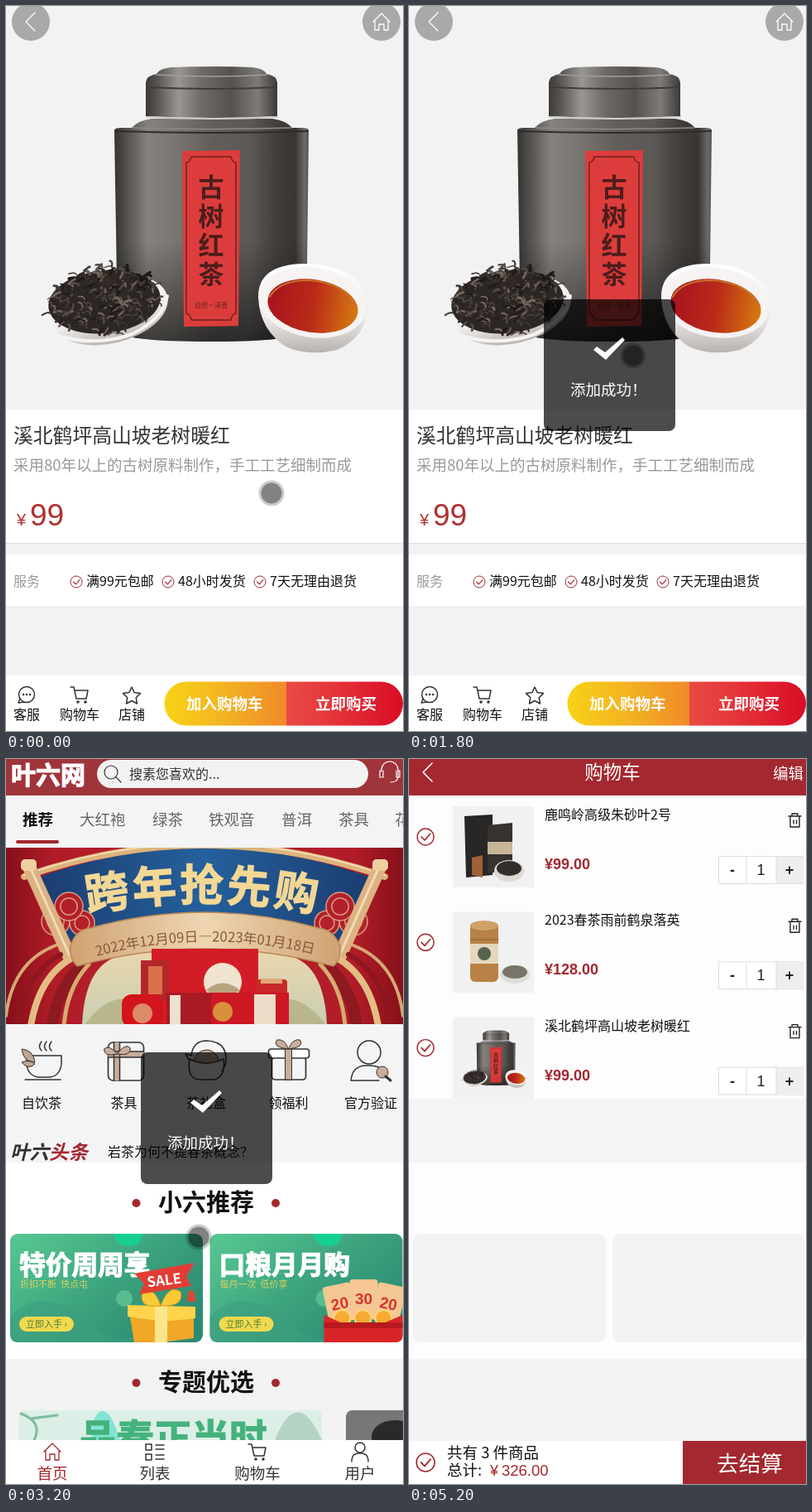
These frames come from a looping animation (480 by 875 pixels, 6000 ms). An HTML page:

```html
<!DOCTYPE html>
<html lang="zh-CN">
<head>
<meta charset="utf-8">
<title>购物流程</title>
<style>
html, body { margin: 0; width: 100%; height: 100%; overflow: hidden; background: #fff; }
svg { display: block; width: 480px; height: 875px; }
text { font-family: "Noto Sans CJK SC", "Noto Sans CJK", "Noto Sans", sans-serif; white-space: pre; }
.num { font-family: "Liberation Sans", Arial, sans-serif; }
.line { fill: none; stroke-linecap: round; stroke-linejoin: round; }
</style>
</head>
<body>
<svg id="stage" viewBox="0 0 480 875"></svg>
<script>
const RED = '#a3282f', DARK = '#333', GREY = '#f2f2f2';

// Drawing helpers, each returns markup
const text = (x, y, s, size, fill = '#111', more = '') =>
  `<text x="${x}" y="${y}" font-size="${size}" fill="${fill}" ${more}>${s}</text>`;
const mid = (x, y, s, size, fill, more = '') => text(x, y, s, size, fill, 'text-anchor="middle" ' + more);
const heavy = fill => `font-weight="900" stroke="${fill}" stroke-width="1.2"`;
const rect = (x, y, w, h, fill, r = 0, more = '') =>
  `<rect x="${x}" y="${y}" width="${w}" height="${h}" rx="${r}" fill="${fill}" ${more}/>`;
const circle = (x, y, r, fill, more = '') => `<circle cx="${x}" cy="${y}" r="${r}" fill="${fill}" ${more}/>`;
const oval = (x, y, rx, ry, fill, more = '') =>
  `<ellipse cx="${x}" cy="${y}" rx="${rx}" ry="${ry}" fill="${fill}" ${more}/>`;
const shape = (d, fill, more = '') => `<path d="${d}" fill="${fill}" ${more}/>`;
const line = (d, stroke = DARK, w = 1.5) => `<path class="line" d="${d}" stroke="${stroke}" stroke-width="${w}"/>`;
const at = (x, y, s, more = '') => `<g transform="translate(${x} ${y}) ${more}">${s}</g>`;
const ring = (x, y, r, stroke = DARK, w = 1.5) => circle(x, y, r, 'none', `stroke="${stroke}" stroke-width="${w}"`);
const grad = (id, stops, dir = '') => `<linearGradient id="${id}" ${dir}>` +
  stops.map(([o, c]) => `<stop offset="${o}" stop-color="${c}"/>`).join('') + '</linearGradient>';
const BOLD = 'font-weight="700"', DOWN = 'x2="0" y2="1"';

const tick = (x, y, r) => ring(x, y, r, RED, r / 7) +
  line(`M${x - r * .5} ${y}l${r * .4} ${r * .4}l${r * .65} ${-r * .75}`, RED, r / 6);
const house = (x, y, c) => at(x, y, line('M-10 0L0-10L10 0M-8-1V10H-3V3H3V10H8V-1', c, 1.3));
const cart = (x, y) => at(x, y, line('M-11-9H-7L-4 5H8L10-5H-6') + circle(-2, 9, 1.8, DARK) + circle(7, 9, 1.8, DARK));

let seed = 7;
const rnd = () => (seed = seed * 16807 % 2147483647) / 2147483647;

const defs = '<defs>' +
  grad('metal', [[0, '#353331'], [.05, '#4d4a47'], [.17, '#85817d'], [.3, '#7b7773'], [.5, '#615e5b'], [.7, '#5b5855'], [.84, '#403d3b'], [.93, '#383634'], [.98, '#6d6a67'], [1, '#54514f']]) +
  grad('cap', [[0, '#3d3a38'], [.08, '#55524f'], [.25, '#9a9793'], [.42, '#6e6b68'], [.65, '#54514e'], [.85, '#7f7b78'], [1, '#3c3a38']]) +
  grad('shade', [[0, '#0000'], [.55, '#0000'], [1, '#0008']], DOWN) +
  grad('brew', [[0, '#a8131f'], [.5, '#b92a18'], [1, '#d67a10']]) +
  grad('china', [[0, '#fff'], [.6, '#eeecec'], [1, '#b9b2ae']], DOWN) +
  grad('gold', [[0, '#f8d216'], [.5, '#f2b322'], [1, '#f0892a']]) +
  grad('hot', [[0, '#e84a45'], [.4, '#e5353a'], [1, '#da0c26']]) +
  grad('drape', [[0, '#86101a'], [.12, '#b01c27'], [.5, '#b8222c'], [.88, '#b01c27'], [1, '#86101a']]) +
  grad('blue', [[0, '#1b3a6e'], [.5, '#24619c'], [1, '#1b3a6e']]) +
  grad('cream', [[0, '#d0a273'], [.5, '#eed6b2'], [1, '#d0a273']]) +
  grad('scene', [[0, '#ecd7ad'], [1, '#c9cfb4']], DOWN) +
  grad('green', [[0, '#58c892'], [.6, '#3aa17c'], [1, '#2c8a72']], 'y2=".7"') +
  '<clipPath id="banner"><path d="M0 107H480V320H0Z"/></clipPath>' +
  '<clipPath id="peek"><path d="M0 786H480V822H0Z"/></clipPath>' +
  '<path id="titleArc" d="M72 190Q238 152 404 191"/><path id="dateArc" d="M92 243Q240 199 390 240"/></defs>';

function leaves() {
  const tones = ['#1e1917', '#332c29', '#544b46', '#75675e', '#2a2422', '#443c39'];
  let s = oval(119, 357, 68, 38, '#2d2724', 'transform="rotate(-6 119 357)"');
  for (let i = 0; i < 260; i++) {
    const a = rnd() * 6.283, r = Math.sqrt(rnd()), d = rnd() * 6.283;
    const x = 119 + 69 * r * Math.cos(a), y = 356 + 42 * r * Math.sin(a) - (x - 119) * .08;
    const dx = 9 * Math.cos(d), dy = 7 * Math.sin(d);
    s += line(`M${x.toFixed(1)} ${y.toFixed(1)}q${(dx / 2 + 3).toFixed(1)} ${(dy / 2 - 3).toFixed(1)} ${dx.toFixed(1)} ${dy.toFixed(1)}`,
      tones[i % 6], 1.2 + rnd() * 1.8);
  }
  return s;
}

function teaSet() {
  const body = 'M131 150Q131 147 140 147H152Q160 138 176 136H322Q338 138 346 147H357Q366 147 366 150L363 394Q340 405 248 405Q150 405 135 394Z';
  const lid = 'M169 92Q170 84 182 82Q186 75 200 74Q248 72 298 74Q311 75 315 82Q327 84 328 92V133Q248 137 169 133Z';
  return '<g id="tea">' + shape(body, 'url(#metal)') + shape(body, 'url(#shade)') +
    line('M132 151Q248 155 365 151', '#2f2d2b', 2) + line('M153 147Q248 150 345 147', '#8c8986', 1.5) +
    shape(lid, 'url(#cap)') + line('M170 98Q248 102 327 98', '#3f3c3a', 2) +
    line('M182 83Q248 87 315 83', '#a09d9a', 1.5) + line('M170 134Q248 138 328 134', '#d0cdca', 2) +
    shape('M213 175L283 174L281 386L215 387Z', '#dc3d3c') +
    line('M224 182H272Q273 188 278 189V371Q273 372 272 379H224Q223 372 218 371V189Q223 188 224 182Z', '#6c2220', 1.5) +
    [...'古树红茶'].map((c, i) => mid(248, 230 + i * 35, c, 31, '#4d1d1b', BOLD)).join('') +
    mid(248, 364, '自然·清香', 8, '#6c2220') +
    oval(126, 367, 71, 40, 'url(#china)', 'transform="rotate(-14 126 367)"') + leaves() +
    line('M60 397Q108 412 152 396Q190 378 195 350', '#f5f3f1', 4) +
    shape('M305 352Q304 312 360 311Q432 313 438 360Q436 400 400 415Q368 423 340 412Q307 392 305 352Z', 'url(#china)') +
    oval(371, 358, 65, 42, '#f6f3f2', 'transform="rotate(9 371 358)"') +
    oval(371, 362, 55, 32, 'url(#brew)', 'transform="rotate(9 371 362)"') +
    line('M319 351Q330 331 366 331Q410 334 424 362', '#c5722c', 2) + '</g>';
}

function product() {
  const perks = [[85, '满99元包邮'], [196, '48小时发货'], [307, '7天无理由退货']];
  const pill = 'M339 815.5H218a26.5 26.5 0 0 0 0 53H339Z';
  return rect(0, 0, 480, 875, GREY) + teaSet() +
    circle(30, 19, 23, '#a9a9a9') + line('M35 8L24 19L35 30', '#fff', 1.3) +
    circle(454, 19, 23, '#a9a9a9') + house(454, 19, '#fff') +
    rect(0, 487, 480, 161, '#fff') + rect(0, 648, 480, 1, '#ddd') + rect(0, 662, 480, 62, '#fff') +
    text(9, 527, '溪北鹤坪高山坡老树暖红', 23.8, DARK) +
    text(9, 561, '采用80年以上的古树原料制作，手工工艺细制而成', 18.5, '#999') +
    text(13, 627, '¥', 20, '#b0302f', 'class="num"') + text(29, 627, '99', 37, '#b0302f', 'class="num"') +
    text(9, 700, '服务', 16, '#999') +
    perks.map(([x, s]) => tick(x, 695, 7) + text(x + 12, 700, s, 16)).join('') +
    rect(0, 808, 480, 67, '#fff') +
    ring(25, 831, 9.5) + line('M17 836L15 841L22 840') + [21, 25, 29].map(x => circle(x, 831, 1.3, DARK)).join('') +
    cart(89, 831) +
    line('M152 822L155.2 828.6L162.5 829.6L157.2 834.7L158.5 842L152 838.5L145.5 842L146.8 834.7L141.5 829.6L148.8 828.6Z') +
    text(9, 861, '客服', 16) + text(65, 861, '购物车', 16) + text(136, 861, '店铺', 16) +
    shape(pill, 'url(#gold)') + shape('M339 815.5H453.5a26.5 26.5 0 0 1 0 53H339Z', 'url(#hot)') +
    shape(pill, '#000', 'id="dim" opacity=".1"') +
    text(218, 849, '加入购物车', 18.5, '#fff', BOLD) + text(374, 849, '立即购买', 18.5, '#fff', BOLD);
}

function banner() {
  const side = [[60, 196, 17], [92, 198, 15], [76, 178, 17]].map(([x, y, r]) =>
      circle(x, y, r, '#b3202b') + ring(x, y, r, '#d99a7c') + ring(x, y, r * .6, '#d99a7c')).join('') +
    shape('M18 128L34 124L86 238L72 248Z', '#dcb183') + line('M28 128L78 240', '#f3dcb6', 3) +
    rect(18, 121, 19, 14, '#efd0a0', 5) +
    line('M80 240Q40 262 30 322', '#e3bd84', 8) + line('M95 246Q62 275 56 322', '#8c1a20', 14) +
    line('M100 248Q74 275 70 322', '#d6ab70', 5) + line('M60 225Q8 245 0 310', '#d6a873', 4) +
    line('M66 236Q24 258 14 322', '#8f1620', 6);
  const arc = (id, s, size, fill, more) =>
    `<text font-size="${size}" fill="${fill}" text-anchor="middle" ${more}><textPath href="#${id}" startOffset="50%">${s}</textPath></text>`;
  return '<g clip-path="url(#banner)">' + rect(0, 107, 480, 213, 'url(#drape)') +
    shape('M92 320Q95 255 130 240Q240 206 350 240Q385 255 388 320Z', 'url(#scene)') +
    shape('M96 320Q120 285 150 290Q240 265 330 290Q360 285 386 320Z', '#b7b68d') +
    shape('M30 146Q240 68 450 146L400 222Q240 164 80 222Z', 'url(#blue)') +
    line('M22 142Q240 66 458 142', '#dcb37c', 8) + line('M22 140Q240 64 458 140', '#f3dcb0', 2) +
    side + `<g transform="translate(480 0) scale(-1 1)">${side}</g>` +
    shape('M78 226Q84 206 102 204Q240 166 378 204Q396 206 404 226Q406 240 396 250Q240 208 86 250Q76 240 78 226Z', 'url(#cream)', 'stroke="#b98a58" stroke-width="1.5"') +
    arc('titleArc', '跨年抢先购', 53, '#f3d795', heavy('#f3d795') + ' letter-spacing="3"') +
    arc('dateArc', '2022年12月09日—2023年01月18日', 16.7, '#86593a', '') +
    rect(176, 229, 129, 92, '#d31d26') + circle(262, 269, 23, '#f0e3cf') + shape('M242 279Q262 262 283 279Q262 296 242 279Z', '#b8a37f') +
    rect(163, 243, 34, 50, '#b3272a') + rect(172, 250, 17, 34, '#db704a') +
    rect(303, 266, 37, 30, '#c82a2a', 4) + rect(308, 265, 26, 6, '#e0a878') +
    rect(140, 284, 50, 40, '#d4141c', 12) + circle(165, 307, 12, '#dd8a68') +
    rect(194, 282, 54, 40, '#a91b24') + rect(198, 285, 13, 36, '#eee1cd') +
    rect(248, 282, 94, 40, '#cc1822') + circle(262, 305, 12, '#d8903f') + rect(300, 284, 26, 36, '#eddcc8') + '</g>';
}

function shortcuts() {
  const edge = 'stroke="#333" stroke-width="1.7"';
  const icons = [
    line('M-18-6H24V4Q22 20 8 20H-4Q-17 18-18 4ZM-20 23H23') + line('M0-12q-5-5 0-11M6-12q-5-5 0-11M12-12q-5-5 0-11') +
      shape('M-24-14Q-10-13-8 2Q-22 2-24-14ZM-24 2Q-14-2-8 4Q-16 12-24 2Z', '#bda595', 'stroke="#333"'),
    rect(-19, -22, 43, 46, 'none', 6, edge) + rect(-12, -22, 7, 46, '#c9ad9b') +
      rect(-19, -11, 43, 7, '#c9ad9b') + line('M-19-11H24M-19-4H24M-5-22V24M-12-22V24') +
      shape('M-8-8Q-18-20-24-14Q-24-4-8-8ZM-8-8Q2-22 8-15Q8-5-8-8Z', '#c9ad9b', 'stroke="#333"'),
    line('M-20-2Q-24 22-8 23H9Q24 20 21-2M-20 0L-25-8L-17-6M-18-6Q-16-24 1-24Q23-23 24-4Q24 8 19 12M-20-2Q0 8 21-2') +
      shape('M-15 0Q-11-12 0-13Q11-13 16 0Q0 6-15 0Z', '#c9ad9b', 'stroke="#333"'),
    rect(-20, -4, 41, 27, 'none', 4, edge) + rect(-24, -14, 49, 11, '#fff', 3, edge) + rect(-4, -14, 8, 37, '#c9ad9b', 0, 'stroke="#333"') +
      shape('M0-14Q-20-16-14-25Q-5-27 0-14Q5-27 14-25Q20-16 0-14Z', '#c9ad9b', 'stroke="#333"'),
    ring(-2, -10, 14) + line('M-24 24Q-22 5-4 6Q10 5 15 13M-24 24H10') + circle(14, 14, 7, '#c9ad9b', 'stroke="#333"') + line('M18 19L24 24', DARK, 3)
  ];
  return ['自饮茶', '茶具', '茶礼盒', '领福利', '官方验证'].map((s, i) =>
    at(43 + i * 99.5, 364, icons[i]) + mid(43 + i * 99.5, 421, s, 16)).join('');
}

function promo(x, title, note, gift) {
  return at(x, 573, rect(0, 0, 233, 131, 'url(#green)', 9) +
    shape('M0 100Q40 60 90 105T180 100V131H9Q0 131 0 122Z', '#3c9f80', 'opacity=".6"') +
    shape('M125 0H160Q158 15 143 15Q128 14 125 0Z', '#18cf92') + circle(138, 78, 10, '#57bd91') +
    text(11, 49, title, 31.7, '#fff', heavy('#fff')) + text(12, 65, note, 11, '#d9d060') +
    rect(11, 100, 66, 18, '#f0d94e', 9) + text(19, 113, '立即入手 ›', 11, '#4c7d3a') + gift);
}

function home() {
  const sale = shape('M145 100H222V126L184 131H150Z', '#f0a826') + shape('M142 86L224 88V102L186 106L142 100Z', '#ffd34c') +
    shape('M175 87H190V131H175Z', '#fbe58c') +
    shape('M182 87Q155 90 160 72Q174 62 182 87Q192 60 206 70Q211 88 182 87Z', '#f9c936', 'stroke="#d99a20"') +
    shape('M150 48L223 35L213 52L219 63L156 73L162 60Z', '#e23d35') +
    mid(187, 62, 'SALE', 17, '#fff', BOLD + ' transform="rotate(-7 187 62)"') + shape('M214 82Q214 68 219 68Q224 68 224 82Z', '#d64b35');
  const coupon = (x, y, n, a) => at(x, y, rect(-17, -23, 34, 46, '#f5c793', 4) + mid(0, 7, n, 19, '#d5352c', 'class="num" ' + BOLD), `rotate(${a})`);
  const gifts = coupon(157, 84, '20', -12) + coupon(216, 84, '20', 12) + coupon(186, 78, '30', 0) +
    [160, 185, 210].map(x => circle(x, 102, 10, '#f5ab34', 'stroke="#ffd372" stroke-width="2"')).join('') +
    shape('M138 98L158 107H212L233 98V123Q233 131 224 131H138Z', '#d92527') + shape('M138 107H233V114H138Z', '#b8191f');
  const heading = (y, s) => mid(242, y + 10, s, 29, '#111', BOLD) + circle(157.5, y, 5, RED) + circle(326, y, 5, RED);
  const tabs = [[89, '大红袍'], [177, '绿茶'], [245, '铁观音'], [333, '普洱'], [402, '茶具'], [470, '花茶']];
  const menu = [[56, '首页'], [180, '列表'], [304, '购物车'], [428, '用户']];
  return rect(0, 0, 480, 875, '#fff') + rect(0, 0, 480, 44, '#a0343b') + text(6, 30, '叶六网', 30, '#fff', heavy('#fff')) +
    rect(110, 1, 328, 34, '#f2f2f2', 17) + ring(127, 16, 8, DARK, 1.2) + line('M133 22L139 28', DARK, 1.2) +
    text(149, 24, '搜素您喜欢的...', 16, DARK) +
    line('M454 15V13A10 10 0 0 1 474 13V22Q473 28 465 28M454 14h-2v8h4v-8M474 14h2v8h-4v-8', '#fff', 1.2) +
    rect(0, 44, 480, 63, '#f4f4f4') + text(20, 80, '推荐', 18.5, '#111', BOLD) + rect(12, 98, 52, 4, RED, 2) +
    tabs.map(([x, s]) => text(x, 80, s, 18.5, '#666')).join('') + banner() +
    rect(0, 320, 480, 167, '#f4f4f4') + shortcuts() + rect(163, 446, 160, 1, '#e4e4e4') +
    `<text x="5" y="483" font-size="23.5" font-style="italic" font-weight="700" fill="#333">叶六<tspan fill="${RED}">头条</tspan></text>` +
    text(123, 480, '岩茶为何不提春茶概念？', 16) + heading(536, '小六推荐') +
    promo(5, '特价周周享', '折扣不断  快点屯', sale) + promo(246.5, '口粮月月购', '每月一次  低价享', gifts) +
    rect(0, 724, 480, 98, GREY) + heading(753, '专题优选') +
    '<g clip-path="url(#peek)">' + rect(15, 786, 367, 60, '#dcefe6', 8) + shape('M105 800Q120 765 138 822H103Z', '#82e4d4') +
    shape('M325 822Q352 755 382 822Z', '#b5d3c5') + line('M18 790Q45 800 34 822M30 796L62 792', '#7dbd9c', 3) +
    text(88, 836, '品春正当时', 45.5, '#45b27d', heavy('#45b27d')) + rect(411, 786, 90, 60, '#777', 8) + oval(470, 818, 28, 20, '#2b2929') + '</g>' +
    rect(0, 822, 480, 53, '#fff') + house(56, 836, RED) +
    line('M169 827h7v7h-7zM169 839h7v7h-7zM181 828H191M181 833H191M181 840H191M181 845H191') +
    cart(304, 836) + ring(428, 831, 6) + line('M418 848Q418 837 428 838Q438 837 438 848') +
    menu.map(([x, s], i) => mid(x, 869, s, 18.5, i ? DARK : RED)).join('');
}

function basket() {
  const boxes = shape('M67 69L101 67V140L69 143Z', '#282725') + shape('M95 80L125 77V137H95Z', '#37332e') + rect(95, 100, 30, 15, '#c7b599') +
    shape('M76 119L89 116V143L76 140Z', '#9d6138') + oval(121, 135, 18, 13, '#ddd8d2') + oval(121, 132, 15, 9, '#332e29');
  const tube = rect(74, 198, 34, 71, '#b98145', 6) + oval(91, 201, 17, 6, '#d0a069') + rect(74, 223, 34, 24, '#e5d8be') +
    circle(91, 235, 8, '#57624f') + line('M74 218H108', '#87602f', 1) + oval(128, 260, 18, 11, '#deddd8') + oval(128, 257, 15, 8, '#77756a');
  const pot = at(55.5, 313, '<use href="#tea"/>', 'scale(.2)');
  const items = [['鹿鸣岭高级朱砂叶2号', '99', boxes], ['2023春茶雨前鹤泉落英', '128', tube], ['溪北鹤坪高山坡老树暖红', '99', pot]];
  const row = ([name, price, art], i) => at(0, i * 127.3,
    tick(20, 94, 10) + rect(53, 57, 98, 98, '#f1f1f1') + text(164, 73, name, 16) +
    text(164, 133, `¥${price}.00`, 18, RED, 'class="num" ' + BOLD) +
    line('M459 69H474M463 69V66H470V69M461 70V82H472V70M465 74V78M468.5 74V78', '#222', 1.4) +
    rect(374.5, 117.5, 102, 33, '#fff', 0, 'stroke="#ddd"') + rect(444, 118, 33, 32, '#eee') + line('M408 118V150M444 118V150', '#ddd', 1) +
    ['-', '1', '+'].map((s, k) => mid(391 + k * 34.5, 140, s, 18, '#222', 'class="num"' + (k === 1 ? '' : BOLD))).join('')) + art;
  return rect(0, 0, 480, 875, '#fdfdfd') + rect(0, 0, 480, 44, RED) + line('M28 5L17 16L28 27', '#fff') +
    mid(246, 24, '购物车', 22.5, '#fff') + text(440, 24, '编辑', 18.5, '#fff') +
    rect(0, 410, 480, 77, '#f4f4f4') + rect(5, 573, 233, 131, '#f3f3f3', 9) + rect(246, 573, 233, 131, '#f3f3f3', 9) +
    rect(0, 724, 480, 99, '#f3f3f3') + items.map(row).join('') +
    rect(0, 823, 480, 52, '#fff') + tick(20, 849, 11) +
    text(46, 844, '共有 3 件商品', 18.5) + text(46, 865, '总计:', 18.5) +
    text(98, 865, '¥', 18, RED, 'class="num"') + text(112, 865, '326.00', 18.5, RED, 'class="num"') +
    rect(331, 823, 149, 52, RED) + mid(412, 860, '去结算', 26.6, '#fff');
}

const toast = rect(163, 354, 159, 159, '#000', 8, 'opacity=".7"') +
  shape('M223 415L227 411L237 418L258 400L261 403L238 427Z', '#fff') + text(195, 470, '添加成功！', 18.5, '#fff');
const pointer = circle(0, 0, 15.5, '#000', 'opacity=".2"') + circle(0, 0, 12.5, '#000', 'opacity=".36"');

const layers = { product: product(), home: home(), basket: basket(), toast, pointer };
const $ = id => document.getElementById(id);
$('stage').innerHTML = defs + Object.entries(layers).map(([id, s]) => `<g id="${id}">${s}</g>`).join('');

// Pointer route: time, x, y
const route = [[0, 321, 588], [700, 269, 845], [1200, 269, 845], [1800, 271, 422], [2600, 27, 5], [2800, 27, 5],
  [3000, 60, 80], [3200, 233, 577], [3500, 290, 732], [3700, 312, 830], [4100, 312, 830],
  [4400, 265, 460], [4600, 183, 440], [4800, 8, 375], [4900, -30, 365], [6000, -30, 365]];

function pointerAt(t) {
  const i = route.findIndex(k => k[0] > t);
  const [t0, x0, y0] = route[i - 1], [t1, x1, y1] = route[i];
  const k = (t - t0) / (t1 - t0);
  return [x0 + (x1 - x0) * k, y0 + (y1 - y0) * k];
}

const show = (id, on) => { $(id).style.visibility = on ? 'visible' : 'hidden'; };

function frame() {
  const t = Math.floor(performance.now() % 6000 / 100) * 100;
  show('product', t < 2800);
  show('home', t >= 2800 && t < 4000);
  show('basket', t >= 4000);
  $('dim').style.display = t >= 800 && t < 1100 ? '' : 'none';
  show('toast', t >= 1300 && t < 3400);
  $('pointer').setAttribute('transform', `translate(${pointerAt(t)})`);
  requestAnimationFrame(frame);
}
frame();
</script>
</body>
</html>
```
